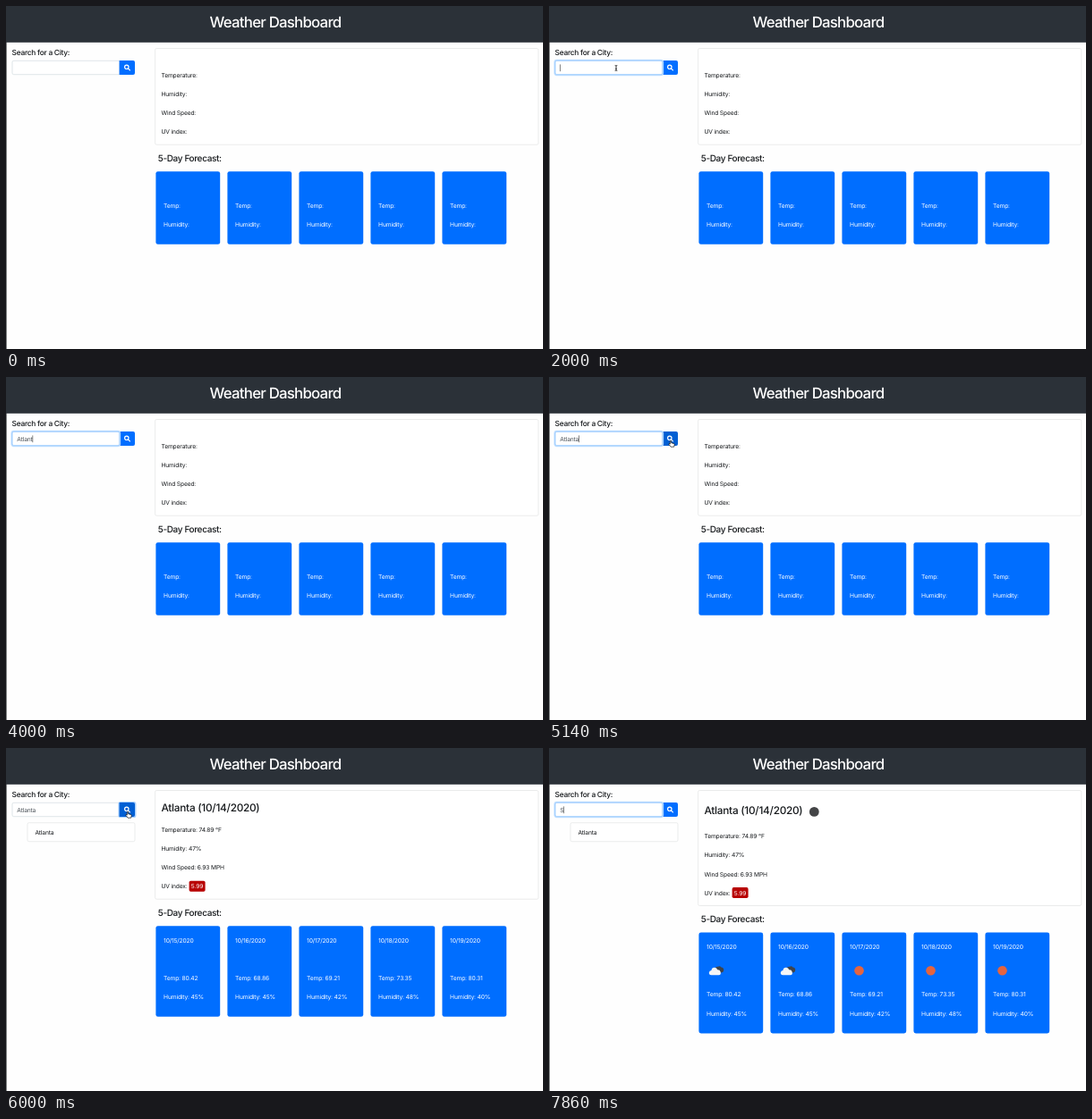
These frames come from a looping animation (600 px wide and 384 px high, 8 s). An HTML page:

```html
<!DOCTYPE html>
<html lang="en">
<head>
<meta charset="utf-8">
<title>Weather Dashboard</title>
<style>
  html, body { margin: 0; width: 100%; height: 100%; overflow: hidden; background: #fefefe; }
  svg { display: block; width: 600px; height: 384px; }
  text {
    font: 6.7px Inter, Roboto, sans-serif;
    letter-spacing: -.023em;
    fill: #16191c;
    text-rendering: geometricPrecision;
    white-space: pre;
  }
  .title { font-size: 16.8px; font-weight: 500; letter-spacing: -.045em; fill: #fff; text-anchor: middle; }
  .label { font-size: 8.4px; font-weight: 500; letter-spacing: -.033em; }
  .city { font-size: 11.8px; font-weight: 500; letter-spacing: -.022em; }
  .forecast { font-size: 10px; font-weight: 500; letter-spacing: -.036em; }
  .light { fill: #fff; }
  #typed { fill: #495057; }
  .box { fill: #fff; stroke: #dedfe0; stroke-width: .6; }
</style>
</head>
<body>
<svg viewBox="0 0 600 384">
  <rect y="40" width=".9" height="344" fill="#707274"/>
  <rect width="600" height="40.8" fill="#2b3138"/>
  <text class="title" x="301" y="24.2">Weather Dashboard</text>
  <text class="label" x="6.6" y="55.2">Search for a City:</text>

  <path class="box" style="stroke:#c9d6da" d="M127 61.3H8.7q-1.7 0-1.7 1.7v12q0 1.7 1.7 1.7H127z"/>
  <g id="buttonRing"><rect x="125.4" y="60" width="20" height="18" rx="2.6" fill="#a9d0ff"/></g>
  <path id="button" d="M126.6 61H142q2 0 2 2v12q0 2-2 2H126.6z"/>
  <g fill="none" stroke="#fff" stroke-width="1.2" stroke-linecap="round">
    <circle cx="134.8" cy="68.3" r="2.2"/><path d="M136.6 70.1l1.8 1.8"/>
  </g>
  <g id="inputRing">
    <rect x="6.3" y="60.6" width="121" height="16.8" rx="2.3" fill="none" stroke="#bfdeff" stroke-width="1.6"/>
    <rect x="7" y="61.3" width="119.8" height="15.4" rx="1.7" fill="#fff" stroke="#80bdff" stroke-width=".7"/>
  </g>
  <text id="typed" x="12.3" y="71.6"></text>
  <rect id="caret" y="65.4" width=".6" height="7.8" fill="#333"/>

  <g id="history">
    <rect class="box" x="24" y="83.7" width="120" height="21" rx="1.7"/>
    <text x="32.5" y="96.9">Atlanta</text>
  </g>
  <g id="scenes"></g>

  <g id="pointer">
    <circle id="press" r="7" fill="#fff" fill-opacity=".6" stroke="#222" stroke-width="1.1"/>
    <path id="arrow" d="M0 0V7l1.6-1.4 1.1 2.5 1.2-.5-1.1-2.4h2.1z" fill="#000" stroke="#fff" stroke-width=".5"/>
    <path id="beam" d="M-1.3-3Q0-3 0-2.2Q0-3 1.3-3M0-2.2V2.2M-1.3 3Q0 3 0 2.2Q0 3 1.3 3M-.8 .8H.8" fill="none" stroke="#111" stroke-width=".8"/>
    <path id="hand" d="M-.7.3Q0-.6.7.3V2.6l2.6.6q1 .3.9 1.3L3.7 7H.1L-2 4.2q-.3-.9.5-.9l.8.6z" fill="#fff" stroke="#111" stroke-width=".7"/>
  </g>
</svg>

<script>
const LOOP = 8000;
const $ = id => document.getElementById(id);
const show = (el, on) => { el.style.display = on ? '' : 'none'; };
const text = (x, y, str, cls = '') => `<text class="${cls}" x="${x}" y="${y}">${str}</text>`;

const days = [
  ['10/15/2020', '80.42', 45, 'cloud'],
  ['10/16/2020', '68.86', 45, 'cloud'],
  ['10/17/2020', '69.21', 42, 'sun'],
  ['10/18/2020', '73.35', 48, 'sun'],
  ['10/19/2020', '80.31', 40, 'sun'],
];
const readings = [['Temperature:', '74.89 °F'], ['Humidity:', '47%'], ['Wind Speed:', '6.93 MPH'], ['UV index:', '']];
const icons = {
  sun: '<circle cx=".5" r="5.3" fill="#e4643f"/>',
  cloud: `<path d="M-1-1.8Q0-5 3-4.4Q5-5.6 6.4-3.6Q9.4-3.4 9.2-.5Q9 2.2 6 2.2H1z" fill="#3f444b"/>
    <path d="M-4.6 5Q-7.4 4.6-7.2 2.2Q-7-.1-4.6-.2Q-4-3.6-.9-3.4Q1.6-3.2 2.2-1Q5-1.2 5.6 1.2Q6.8 4.6 3.6 5z" fill="#f4f5f7"/>`,
};

// The three page layouts: empty, filled in, and filled in with icons.
const layouts = [
  { shift: 0, cardHeight: 81.6 },
  { shift: 14, cardHeight: 101.6, filled: true },
  { shift: 21.3, cardHeight: 113, filled: true, icons: true },
];

function dayCard([date, temp, humidity, icon], i, { shift, cardHeight, filled, icons: withIcons }) {
  const x = 167.4 + i * 80, top = 185.2 + shift, base = top + cardHeight - 19.9, tx = x + 8.7;
  return `<rect x="${x}" y="${top}" width="71.8" height="${cardHeight}" rx="2.4" fill="#006eff"/>`
    + (filled ? text(tx, top + 18.3, date, 'light') : '')
    + (withIcons ? `<g transform="translate(${x + 18.6} ${top + 42.7})">${icons[icon]}</g>` : '')
    + text(tx, base - 21.2, filled ? `Temp: ${temp}` : 'Temp:', 'light')
    + text(tx, base, filled ? `Humidity: ${humidity}%` : 'Humidity:', 'light');
}

function scene(layout) {
  const { shift, filled } = layout;
  const rowY = i => 79.8 + shift + i * 21.2;
  return `<g><rect class="box" x="166.6" y="47.5" width="428.2" height="${107.7 + shift}" rx="1.7"/>`
    + (filled ? text(173.5, 65 + shift / 2.3, 'Atlanta (10/14/2020)', 'city') : '')
    + (layout.icons ? '<circle cx="296.3" cy="71.4" r="5.4" fill="#444547"/>' : '')
    + readings.map(([name, value], i) => text(173.5, rowY(i), filled ? `${name} ${value}` : name)).join('')
    + (filled ? `<rect x="204.6" y="${rowY(3) - 8.6}" width="18" height="12" rx="1.8" fill="#b80404"/>`
      + text(206.8, rowY(3), '5.99', 'light') : '')
    + text(169.8, 173.6 + shift, '5-Day Forecast:', 'forecast')
    + days.map((day, i) => dayCard(day, i, layout)).join('') + '</g>';
}
$('scenes').innerHTML = layouts.map(scene).join('');

// [time, input value]
const typing = [[0, ''], [2710, 'A'], [3290, 'At'], [3570, 'Atl'], [3710, 'Atla'], [3860, 'Atlan'],
  [4000, 'Atlant'], [4140, 'Atlanta'], [7430, ''], [7710, 'S']];
// [time, x, y]
const path = [[570, 104, 364], [710, 101, 300], [860, 96, 225], [1000, 94.8, 191.5], [1140, 94.8, 69],
  [1430, 75, 69.5], [4700, 75, 69.5], [5000, 136, 71.2], [6290, 136, 71.2], [6710, 67.8, 69.8], [8000, 67.8, 69.8]];

const within = (t, ...spans) => spans.some(([a, b]) => t >= a && t < b);
const clamp = v => Math.max(0, Math.min(1, v));
const fade = (t, from, to) => clamp((t - from) / 130) * clamp((to + 130 - t) / 130);
const latest = (list, t) => list.filter(item => item[0] <= t).pop();

function pointerAt(t) {
  const i = path.findIndex(p => p[0] > t);
  if (i < 1) return path[0].slice(1);
  const [t0, x0, y0] = path[i - 1], [t1, x1, y1] = path[i];
  const k = (t - t0) / (t1 - t0);
  return [x0 + (x1 - x0) * k, y0 + (y1 - y0) * k];
}

function drawPointer(t) {
  const [x, y] = pointerAt(t);
  const inRow = y > 61 && y < 77, hand = inRow && x > 127, beam = inRow && !hand;
  show($('pointer'), within(t, [570, 2710], [4710, 7710]));
  $('pointer').setAttribute('transform', `translate(${x} ${y})`);
  show($('press'), within(t, [1570, 1710], [5290, 5430], [6850, 7000]));
  show($('hand'), hand);
  show($('beam'), beam);
  show($('arrow'), !inRow);
}

function drawInput(t) {
  const [keyTime, value] = latest(typing, t);
  const typed = $('typed');
  typed.textContent = value;
  const blinkStart = Math.max(keyTime, latest([[0], [1710], [6850]], t)[0]);
  show($('caret'), within(t, [1710, 5290], [6850, LOOP]) && Math.floor((t - blinkStart) / 500) % 2 === 0);
  $('caret').setAttribute('x', 12.3 + (value ? typed.getComputedTextLength() : 0));
  $('inputRing').style.opacity = Math.max(fade(t, 1710, 5290), fade(t, 7000, LOOP));
  $('buttonRing').style.opacity = fade(t, 5290, 7000);
  $('button').setAttribute('fill', within(t, [4960, 7000]) ? '#005fd3' : '#006eff');
}

function draw(t) {
  const current = t < 5570 ? 0 : t < 6290 ? 1 : 2;
  [...$('scenes').children].forEach((el, i) => show(el, i === current));
  show($('history'), current > 0);
  drawInput(t);
  drawPointer(t);
}

const start = performance.now();
function tick() {
  draw((performance.now() - start) % LOOP);
  requestAnimationFrame(tick);
}
tick();
</script>
</body>
</html>
```
